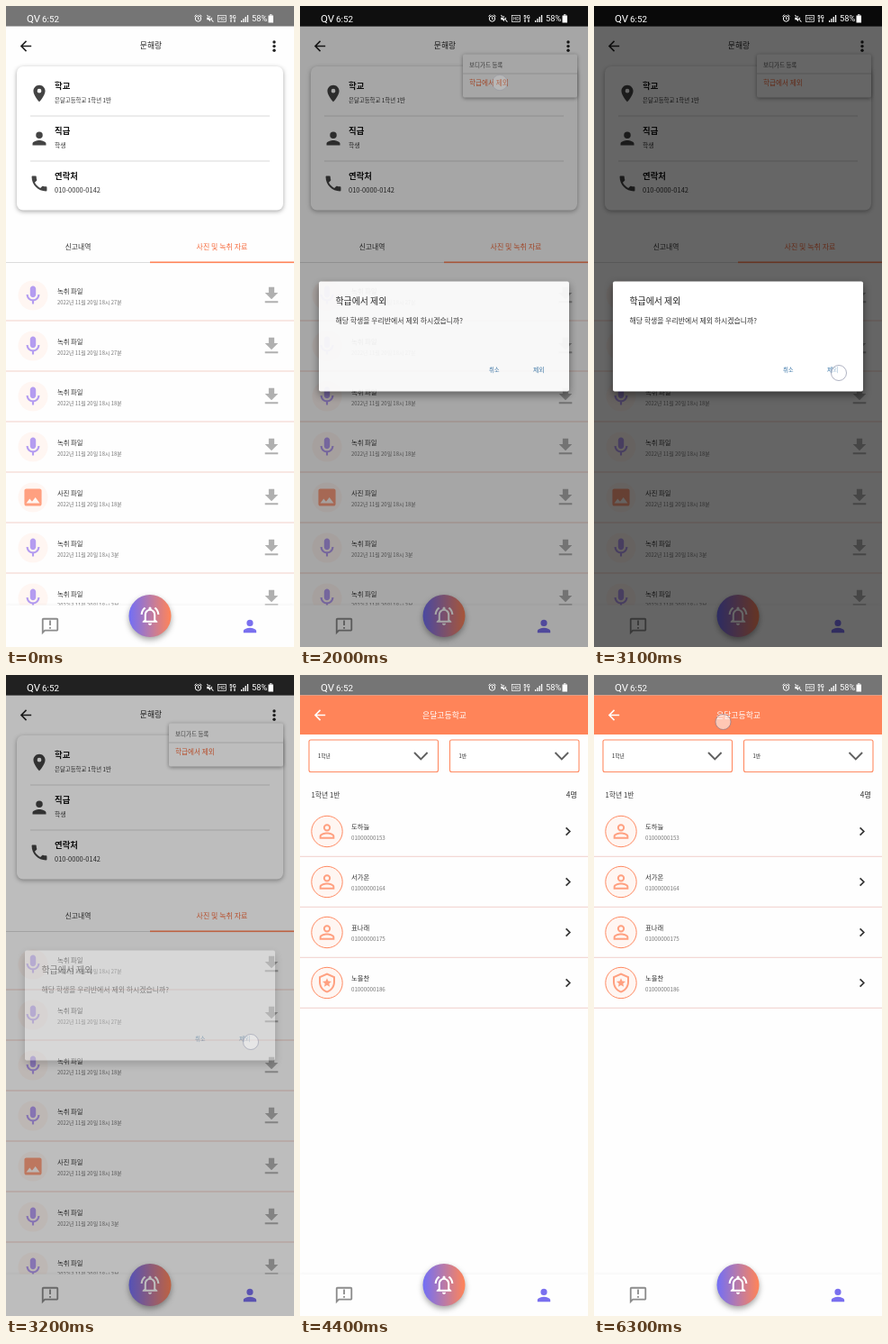
An HTML page with a canvas for the animation above (6400 ms loop, 320 by 711 pixels).

```html
<!DOCTYPE html>
<html lang="ko">
<head>
<meta charset="utf-8">
<style>
html, body { margin: 0; width: 100%; height: 100%; overflow: hidden; background: #fefefe; }
canvas { display: block; width: 320px; height: 711px; }
</style>
</head>
<body>
<canvas id="stage"></canvas>
<script>
const W = 320, H = 711, LOOP = 6400, STEP = 100;
const SCALE = window.devicePixelRatio || 1;
const ORANGE = '#ff8459', PALE = '#fff6f2', PURPLE = '#b49cf0';
const KOREAN = '"Noto Sans CJK KR", "Noto Sans CJK JP", "Noto Sans CJK", sans-serif';
const SCHOOL = '은달고등학교';

const ICONS = {
  back: 'M20 11H7.83l5.59-5.59L12 4l-8 8 8 8 1.41-1.41L7.83 13H20z',
  pin: 'M12 2C8.13 2 5 5.13 5 9c0 5.25 7 13 7 13s7-7.75 7-13c0-3.87-3.13-7-7-7zm0 9.5a2.5 2.5 0 0 1 0-5 2.5 2.5 0 0 1 0 5z',
  person: 'M12 12a4 4 0 0 0 0-8 4 4 0 0 0 0 8zm0 2c-2.67 0-8 1.34-8 4v2h16v-2c0-2.66-5.33-4-8-4z',
  personLine: 'M12 5.9a2.1 2.1 0 0 1 0 4.2 2.1 2.1 0 0 1 0-4.2m0 9c2.97 0 6.1 1.46 6.1 2.1v1.1H5.9V17c0-.64 3.13-2.1 6.1-2.1M12 4a4 4 0 0 0 0 8 4 4 0 0 0 0-8zm0 9c-2.67 0-8 1.34-8 4v3h16v-3c0-2.66-5.33-4-8-4z',
  phone: 'M6.62 10.79c1.44 2.83 3.76 5.14 6.59 6.59l2.2-2.2c.27-.27.67-.36 1.02-.24 1.12.37 2.33.57 3.57.57.55 0 1 .45 1 1V20c0 .55-.45 1-1 1-9.39 0-17-7.61-17-17 0-.55.45-1 1-1h3.5c.55 0 1 .45 1 1 0 1.25.2 2.45.57 3.57.11.35.03.74-.25 1.02z',
  mic: 'M12 14c1.66 0 3-1.34 3-3V5c0-1.66-1.34-3-3-3S9 3.34 9 5v6c0 1.66 1.34 3 3 3zm5-3c0 2.76-2.24 5-5 5s-5-2.24-5-5H5c0 3.53 2.61 6.43 6 6.92V21h2v-3.08c3.39-.49 6-3.39 6-6.92z',
  image: 'M21 19V5c0-1.1-.9-2-2-2H5c-1.1 0-2 .9-2 2v14c0 1.1.9 2 2 2h14c1.1 0 2-.9 2-2zM8.5 13.5l2.5 3.01L14.5 12l4.5 6H5z',
  download: 'M19 9h-4V3H9v6H5l7 7zM5 18v2h14v-2z',
  report: 'M20 2H4c-1.1 0-2 .9-2 2v18l4-4h14c1.1 0 2-.9 2-2V4c0-1.1-.9-2-2-2zm0 14H5.17L4 17.17V4h16zM11 5h2v6h-2zM11 13h2v2h-2z',
  bell: 'M7.58 4.08L6.15 2.65C3.75 4.48 2.17 7.3 2.03 10.5h2c.15-2.65 1.51-4.97 3.55-6.42zM19.97 10.5h2c-.15-3.2-1.73-6.02-4.12-7.85l-1.42 1.43c2.02 1.45 3.39 3.77 3.54 6.42zM18 11c0-3.07-1.64-5.64-4.5-6.32V4a1.5 1.5 0 0 0-3 0v.68C7.63 5.36 6 7.92 6 11v5l-2 2v1h16v-1l-2-2zM16 17H8v-6c0-2.48 1.51-4.5 4-4.5s4 2.02 4 4.5zM12 22a2 2 0 0 0 2-2h-4a2 2 0 0 0 2 2z',
  shield: 'M12 1L3 5v6c0 5.55 3.84 10.74 9 12 5.16-1.26 9-6.45 9-12V5zm7 10c0 4.52-2.98 8.69-7 9.93-4.02-1.24-7-5.41-7-9.93V6.3l7-3.11 7 3.11zM12 6.8l1.4 3.3 3.6.3-2.7 2.4.8 3.5-3.1-1.9-3.1 1.9.8-3.5L7 10.4l3.6-.3z',
  mute: 'M3 9h4l5-5v16l-5-5H3zM4 2l17 18-1.4 1.4L2.6 3.4zM15 8c3 2 3 6 0 8z'
};
for (const name in ICONS) ICONS[name] = new Path2D(ICONS[name]);

const stage = document.getElementById('stage');
const screen = setup(stage);
let g = screen;

function setup(canvas) {
  canvas.width = W * SCALE;
  canvas.height = H * SCALE;
  const context = canvas.getContext('2d');
  context.scale(SCALE, SCALE);
  return context;
}

function layer(draw) {
  const canvas = document.createElement('canvas');
  g = setup(canvas);
  draw();
  g = screen;
  return canvas;
}

function show(canvas, alpha = 1) {
  if (alpha <= 0) return;
  g.globalAlpha = Math.min(1, alpha);
  g.drawImage(canvas, 0, 0, W, H);
  g.globalAlpha = 1;
}

function rect(x, y, w, h, color) {
  g.fillStyle = color;
  g.fillRect(x, y, w, h);
}

function disc(x, y, r, fill, stroke) {
  g.beginPath();
  g.arc(x, y, r, 0, 7);
  if (fill) { g.fillStyle = fill; g.fill(); }
  if (stroke) { g.strokeStyle = stroke; g.lineWidth = 1; g.stroke(); }
}

function panel(x, y, w, h, r, shadow, blur, drop) {
  g.save();
  g.shadowColor = shadow;
  g.shadowBlur = blur * SCALE;
  g.shadowOffsetY = drop * SCALE;
  g.beginPath();
  g.roundRect(x, y, w, h, r);
  g.fillStyle = '#fff';
  g.fill();
  g.restore();
}

function line(points, color, width) {
  g.beginPath();
  points.forEach(([x, y]) => g.lineTo(x, y));
  g.strokeStyle = color;
  g.lineWidth = width;
  g.stroke();
}

function icon(name, x, y, size, color) {
  g.save();
  g.translate(x - size / 2, y - size / 2);
  g.scale(size / 24, size / 24);
  g.fillStyle = color;
  g.fill(ICONS[name], 'evenodd');
  g.restore();
}

function text(str, x, y, size, color, align = 'left', weight = 400, family = KOREAN) {
  g.font = `${weight} ${size}px ${family}`;
  g.textAlign = align;
  g.fillStyle = color;
  g.fillText(str, x, y);
}

function statusBar() {
  const white = '#fff', roboto = 'Roboto, sans-serif';
  text('QV', 23, 18, 11.5, white, 'left', 400, roboto);
  text('6:52', 40, 17.5, 9.8, white, 'left', 400, roboto);
  disc(213.5, 14, 3.2, null, white);
  line([[213.5, 12], [213.5, 14.4], [215, 14.4]], white, 0.8);
  line([[209.5, 11.5], [211.5, 9.7]], white, 1);
  line([[217.5, 11.5], [215.5, 9.7]], white, 1);
  icon('mute', 227, 14, 10, white);
  g.lineWidth = 0.7;
  g.strokeRect(235.5, 10.5, 9, 7);
  text('HD', 240, 16.2, 5.2, white, 'center', 400, roboto);
  text('5G', 252, 13.8, 5.8, white, 'center', 700, roboto);
  line([[250, 18], [250, 14.5]], white, 1.2);
  line([[254, 14.5], [254, 18]], white, 1.2);
  for (let i = 0; i < 4; i++) rect(261 + i * 2.3, 16 - i * 2, 1.3, 2 + i * 2, white);
  text('58%', 273, 17.3, 9.3, white, 'left', 400, roboto);
  rect(291.5, 10.5, 5.5, 8, white);
  rect(293, 9.3, 2.5, 1.2, white);
}

function navBar() {
  g.save();
  g.shadowColor = 'rgba(0,0,0,.08)';
  g.shadowBlur = 4 * SCALE;
  rect(0, 664.5, W, 47, '#fefefe');
  g.restore();
  icon('report', 49, 688, 22, '#8c8c8c');
  icon('person', 271, 688, 21.5, '#7a70ef');
  const blend = g.createLinearGradient(137, 0, 183, 0);
  blend.addColorStop(0, '#736ff5');
  blend.addColorStop(0.5, '#b97aa8');
  blend.addColorStop(1, '#ff8459');
  g.save();
  g.shadowColor = 'rgba(0,0,0,.35)';
  g.shadowBlur = 6 * SCALE;
  g.shadowOffsetY = 3 * SCALE;
  disc(160, 676.5, 23.5, blend);
  g.restore();
  icon('bell', 160, 676.5, 25, '#fff');
}

function base() {
  rect(0, 0, W, H, '#fefefe');
  rect(0, 0, W, 22.5, '#757575');
}

function profilePage() {
  base();
  icon('back', 22, 44.5, 18.5, '#222');
  text('문해랑', 161, 46.8, 8.8, '#222', 'center');
  for (const y of [40, 44.6, 49.2]) disc(298, y, 1.7, '#222');

  panel(12, 67, 296, 159.5, 7, 'rgba(0,0,0,.35)', 5, 1.5);
  const info = [
    ['pin', '학교', SCHOOL + ' 1학년 1반', 6.4],
    ['person', '직급', '학생', 6.8],
    ['phone', '연락처', '010-0000-0142', 7.5]
  ];
  info.forEach(([name, title, detail, size], i) => {
    const y = 97 + i * 50;
    icon(name, 37, y, 22.5, '#444');
    text(title, 54, y - 5.3, 9.4, '#111', 'left', 700);
    text(detail, 54, y + 10, size, '#333');
    if (i < 2) rect(27, y + 24.5, 266, 1, '#d9d9d9');
  });

  text('신고내역', 80, 270.3, 7.8, '#333', 'center');
  text('사진 및 녹취 자료', 240, 270.3, 8, '#f56a3c', 'center');
  rect(0, 284, 160, 1, '#dcdcdc');
  rect(160, 283.5, 160, 1.6, ORANGE);

  [27, 27, 18, 18, 18, 3, 3].forEach((minute, i) => {
    const y = 321 + i * 56, photo = i === 4;
    disc(30, y, 16.5, PALE);
    icon(photo ? 'image' : 'mic', 30, y, 25.5, photo ? '#ffa080' : PURPLE);
    text(photo ? '사진 파일' : '녹취 파일', 57, y - 2.2, 7.3, '#333');
    text(`2022년 11월 20일 18시 ${minute}분`, 57, y + 9.8, 5.9, '#777');
    icon('download', 295, y, 25, '#b0b0b0');
    rect(0, y + 27.5, W, 1, '#f4d2c9');
  });
  navBar();
}

function classPage() {
  base();
  rect(0, 22.5, W, 43.5, ORANGE);
  icon('back', 22, 44.5, 18.5, '#fff');
  text(SCHOOL, 160.5, 47.8, 8.9, '#fff', 'center', 500);

  [[10, '1학년'], [166.5, '1반']].forEach(([x, label]) => {
    g.beginPath();
    g.roundRect(x, 72, 143.5, 35.5, 2);
    g.fillStyle = '#fff';
    g.fill();
    g.strokeStyle = '#ff8a62';
    g.lineWidth = 1.1;
    g.stroke();
    text(label, x + 10, 92.2, 5.8, '#222');
    line([[x + 117, 86], [x + 124.3, 93.4], [x + 131.6, 86]], '#606060', 1.9);
  });
  text('1학년 1반', 12.5, 135.8, 7.8, '#333');
  text('4명', 308, 135.8, 8.4, '#333', 'right');

  ['도하늘', '서가온', '표나래', '노을찬'].forEach((name, i) => {
    const y = 173.5 + i * 56;
    disc(30, y, 17.2, PALE, '#ff8a62');
    icon(i < 3 ? 'personLine' : 'shield', 30, y, i < 3 ? 25 : 24, '#ffa080');
    text(name, 57, y - 2.3, 7.3, '#333');
    text('010000001' + (53 + i * 11), 57, y + 9.6, 6.2, '#777');
    line([[295.6, y - 4.2], [299.8, y], [295.6, y + 4.2]], '#333', 1.7);
    rect(0, y + 27.3, W, 1, '#f0cfcb');
  });
  navBar();
}

function menuBox() {
  panel(181, 53.5, 127, 48, 2, 'rgba(0,0,0,.42)', 4, 1);
  text('보디가드 등록', 188, 67.8, 6.5, '#555');
  rect(181, 74.5, 127, 1, '#dadada');
  text('학급에서 제외', 188, 88, 7.6, '#f56a3c');
}

function dialogBox() {
  panel(21, 305.5, 278, 122, 2, 'rgba(0,0,0,.45)', 10, 4);
  text('학급에서 제외', 39.5, 331.3, 9.9, '#222');
  text('해당 학생을 우리반에서 제외 하시겠습니까?', 39.5, 351.8, 7.9, '#333');
  text('취소', 210, 406.3, 6.3, '#3a76a8');
  text('제외', 259, 406.3, 6.9, '#3a76a8');
}

function touch(x, y, alpha) {
  if (alpha <= 0) return;
  disc(x, y, 8.5, `rgba(255,255,255,${0.55 * alpha})`, `rgba(110,115,145,${0.55 * alpha})`);
}

// Piecewise linear value at time t from [time, value] pairs.
function track(t, ...keys) {
  if (t <= keys[0][0]) return keys[0][1];
  for (let i = 1; i < keys.length; i++) {
    const [t0, v0] = keys[i - 1], [t1, v1] = keys[i];
    if (t <= t1) return v0 + (v1 - v0) * (t - t0) / (t1 - t0);
  }
  return keys[keys.length - 1][1];
}

const profile = layer(profilePage), classroom = layer(classPage);
const menu = layer(menuBox), dialog = layer(dialogBox);

function render(t) {
  const swap = track(t, [3300, 0], [3700, 1]);
  if (swap < 1) {
    show(profile);
    show(menu, track(t, [500, 0], [800, 1]));
  }
  show(classroom, swap);

  const dim = track(t, [1900, 0], [2000, 0.35], [2100, 0.6], [3100, 0.6], [3200, 0.26], [3300, 0]);
  if (dim > 0) {
    rect(0, 0, W, H, `rgba(0,0,0,${dim})`);
    rect(0, 0, W, 22.5, `rgba(0,0,0,${Math.min(0.8, dim * 2.4)})`);
  }
  touch(222, 85, track(t, [1700, 0], [1800, 0.7], [1900, 0.7], [2000, 0.35], [2100, 0]));
  show(dialog, track(t, [1900, 0], [2000, 0.92], [2100, 1], [3100, 1], [3200, 0.4], [3300, 0]));
  statusBar();

  touch(298, 44, track(t, [200, 0], [400, 0.9], [600, 0.9], [900, 0]));
  touch(272, 407, track(t, [3000, 0], [3100, 1], [3200, 0.7], [3300, 0.15], [3400, 0]));
  touch(143.5, 52, track(t, [5300, 0], [5500, 1], [5700, 1], [6000, 0], [6200, 1]));
}

function tick(now) {
  render(Math.floor(now % LOOP / STEP) * STEP);
  requestAnimationFrame(tick);
}
render(0);
requestAnimationFrame(tick);
</script>
</body>
</html>
```
